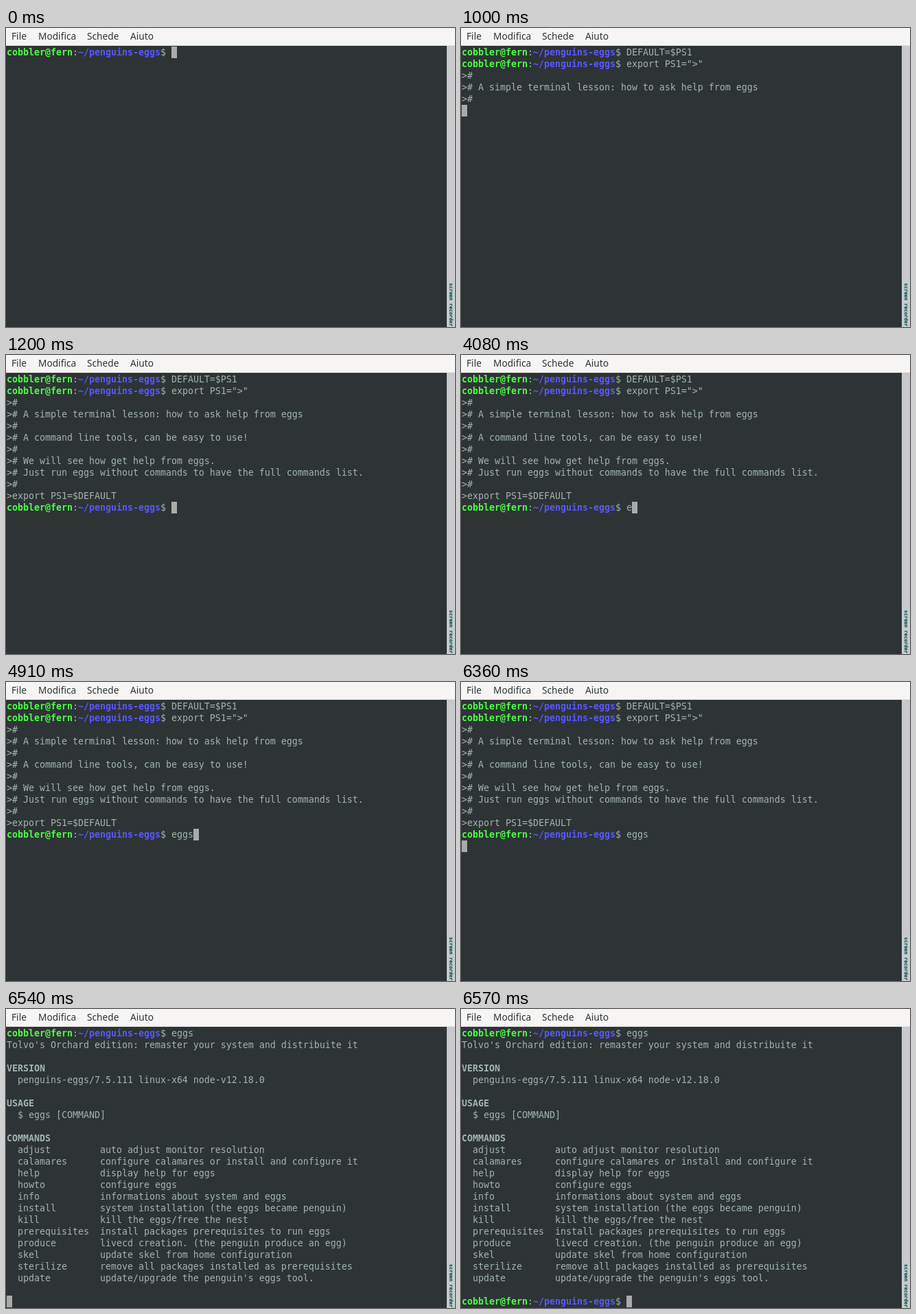
An HTML page for the animation above (8 s loop, 654x436 px).

```html
<!DOCTYPE html>
<html lang="it">
<head>
<meta charset="utf-8">
<title>Terminal</title>
<style>
  html, body { margin: 0; width: 100%; height: 100%; overflow: hidden; background: #2e3436; }
  nav { position: absolute; inset: 0 0 auto; height: 25px; background: #f6f5f4; border-bottom: 1px solid #e4e1de;
    font: 13.7px/24px "Noto Sans", "Open Sans", sans-serif; color: #2e3436; }
  nav span { position: absolute; top: 0; }
  #bar { position: absolute; left: 642px; top: 26px; width: 12px; height: 410px; background: #c9c9cb; }
  #mark { position: absolute; left: 2px; top: 346px; height: 60px; writing-mode: vertical-rl; white-space: nowrap;
    font: bold 7px/8px "DejaVu Sans Mono", monospace; color: #1d4040; text-shadow: 0 0 1px #3cc; }
  #screen { position: absolute; left: 1px; top: 27px; margin: 0; color: #a2b4ac;
    font: 13.29px/17px "DejaVu Sans Mono", monospace; font-variant-ligatures: none; }
  #cursor { position: absolute; width: 8px; height: 17px; background: #aaa; }
  .user { color: #4cff44; }
  .path { color: #5858ff; }
</style>
</head>
<body>
<nav>
  <span style="left:8px">File</span>
  <span style="left:47px">Modifica</span>
  <span style="left:118px">Schede</span>
  <span style="left:181px">Aiuto</span>
</nav>
<pre id="screen"></pre>
<div id="cursor"></div>
<div id="bar"><div id="mark">screen recorder</div></div>
<script>
const LOOP = 8000, ROWS = 24, COL = 8, ROW = 17;
const PROMPT = '<b class="user">cobbler@fern</b>:<b class="path">~/penguins-eggs</b>$ ';
const PROMPT_COLS = 30;

const commands = [
  ['adjust', 'auto adjust monitor resolution'],
  ['calamares', 'configure calamares or install and configure it'],
  ['help', 'display help for eggs'],
  ['howto', 'configure eggs'],
  ['info', 'informations about system and eggs'],
  ['install', 'system installation (the eggs became penguin)'],
  ['kill', 'kill the eggs/free the nest'],
  ['prerequisites', 'install packages prerequisites to run eggs'],
  ['produce', 'livecd creation. (the penguin produce an egg)'],
  ['skel', 'update skel from home configuration'],
  ['sterilize', 'remove all packages installed as prerequisites'],
  ['update', "update/upgrade the penguin's eggs tool."],
].map(([name, about]) => '  ' + name.padEnd(15) + about);

const log = [
  PROMPT + 'DEFAULT=$PS1',
  PROMPT + 'export PS1=">"',
  '>#',
  '># A simple terminal lesson: how to ask help from eggs',
  '>#',
  '># A command line tools, can be easy to use!',
  '>#',
  '># We will see how get help from eggs.',
  '># Just run eggs without commands to have the full commands list.',
  '>#',
  '>export PS1=$DEFAULT',
  PROMPT + 'eggs',
  "Tolvo's Orchard edition: remaster your system and distribuite it",
  '',
  '<b>VERSION</b>',
  '  penguins-eggs/7.5.111 linux-x64 node-v12.18.0',
  '',
  '<b>USAGE</b>',
  '  $ eggs [COMMAND]',
  '',
  '<b>COMMANDS</b>',
  ...commands,
  '',
];

// [start ms, finished lines, text typed at the prompt (omitted: no prompt yet)]
const steps = [
  [0, 0, ''],
  [1000, 5],
  [1100, 8],
  [1200, 11, ''],
  [4080, 11, 'e'],
  [4430, 11, 'eg'],
  [4640, 11, 'egg'],
  [4910, 11, 'eggs'],
  [6360, 12],
  [6440, 20],
  [6540, 34],
  [6570, 34, ''],
];

const screen = document.getElementById('screen');
const cursor = document.getElementById('cursor');
let shown;

function show([, count, typed]) {
  const atPrompt = typed !== undefined;
  const lines = [...log.slice(0, count), atPrompt ? PROMPT + typed : ''].slice(-ROWS);
  screen.innerHTML = lines.join('\n');
  cursor.style.left = 1 + COL * (atPrompt ? PROMPT_COLS + typed.length : 0) + 'px';
  cursor.style.top = 27 + ROW * (lines.length - 1) + 'px';
}

const start = performance.now();
function tick() {
  const t = (performance.now() - start) % LOOP;
  const step = steps.findLast(s => s[0] <= t);
  if (step !== shown) show(shown = step);
  requestAnimationFrame(tick);
}
tick();
</script>
</body>
</html>
```
